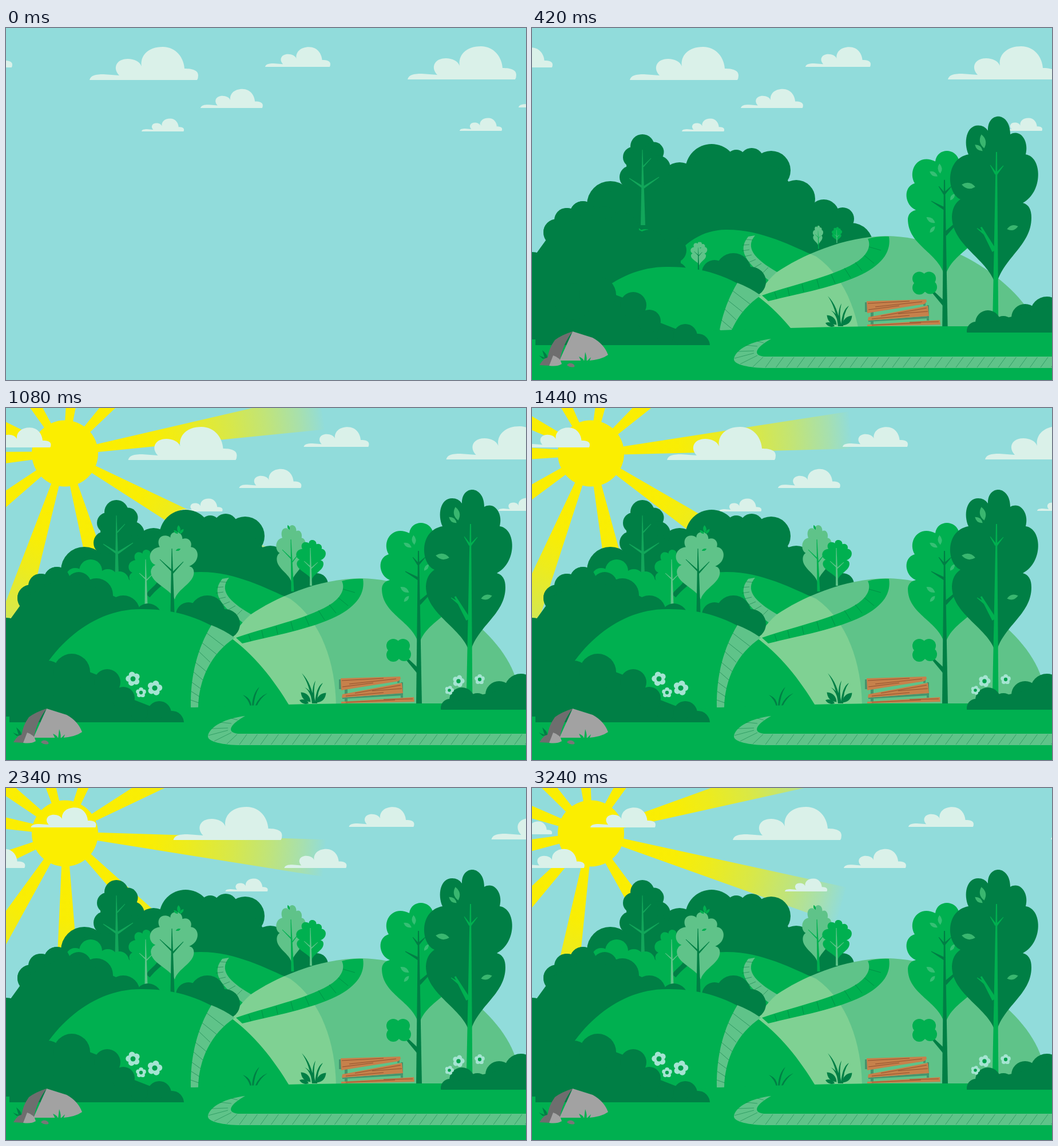
An HTML page with a canvas for the animation above (3.3 s loop, 909 px wide and 616 px high).

```html
<!DOCTYPE html>
<html lang="en">
<head>
<meta charset="utf-8">
<title>Sunny park</title>
<style>
html, body { margin: 0; width: 100%; height: 100%; overflow: hidden; background: #91dcdb; }
canvas { display: block; }
</style>
</head>
<body>
<canvas id="stage" width="909" height="616"></canvas>
<script>
const ctx = document.getElementById('stage').getContext('2d');
const LOOP = 3300, STEP = 60;
const SKY = '#91dcdb', CLOUD = '#daf1e9', DARK = '#007f45', GREEN = '#00b050',
  LIGHT = '#5fc389', PALE = '#7fd193', WOOD = '#c6814b', YELLOW = '#fbee00';

const CLOUD_PATH = new Path2D('M0 0C2-8 10-10 25-10L52-8C40-20 46-37 67-37C78-37 88-32 91-24C88-42 102-58 128-58C152-58 165-38 166-20C180-20 190-17 190-8Q190-3 188 0Z');
const CROWN = new Path2D('M811 430C800 385 734 362 734 312Q735 292 749 283C724 272 722 214 763 207C754 187 759 158 780 158Q791 158 797 167C796 134 836 134 836 173C855 163 869 186 863 207C892 211 894 270 858 289Q873 293 873 314C873 362 822 382 811 430Z');

// [angle in degrees at 720 ms, degrees per second]
const RAYS = [[-13.6, 11.75], [24.4, 13], [70, 11.7], [103, 12], [138.3, 12.1],
  [172, 11], [198.6, 11.7], [234, 11.8], [273, 11.6], [307.5, 14.4]];

// linear interpolation through [time, value] keys
function key(t, keys) {
  if (t <= keys[0][0]) return keys[0][1];
  for (let i = 1; i < keys.length; i++) {
    const [t0, a] = keys[i - 1], [t1, b] = keys[i];
    if (t <= t1) return a + (b - a) * (t - t0) / (t1 - t0);
  }
  return keys[keys.length - 1][1];
}

function shape(color, d) {
  ctx.fillStyle = color;
  ctx.fill(typeof d === 'string' ? new Path2D(d) : d);
}

function line(color, width, d) {
  ctx.strokeStyle = color;
  ctx.lineWidth = width;
  ctx.stroke(new Path2D(d));
}

function blobs(color, list) {
  ctx.fillStyle = color;
  for (const [x, y, r] of list) {
    ctx.beginPath();
    ctx.arc(x, y, r, 0, 7);
    ctx.fill();
  }
}

// tapered stroke
function limb(color, x0, y0, w0, x1, y1, w1) {
  const a = Math.atan2(y1 - y0, x1 - x0) + Math.PI / 2;
  const c = Math.cos(a) / 2, s = Math.sin(a) / 2;
  ctx.fillStyle = color;
  ctx.beginPath();
  ctx.moveTo(x0 + c * w0, y0 + s * w0);
  ctx.lineTo(x1 + c * w1, y1 + s * w1);
  ctx.lineTo(x1 - c * w1, y1 - s * w1);
  ctx.lineTo(x0 - c * w0, y0 - s * w0);
  ctx.fill();
}

function leaf(color, x, y, len, deg, w = len * .42) {
  group(() => {
    ctx.translate(x, y);
    ctx.rotate(deg * Math.PI / 180);
    shape(color, `M${-len / 2} 0Q0 ${-w} ${len / 2} 0Q0 ${w} ${-len / 2} 0Z`);
  });
}

function group(draw) {
  ctx.save();
  draw();
  ctx.restore();
}

function lifted(dy, draw) {
  group(() => { ctx.translate(0, dy); draw(); });
}

function popped(x, y, s, draw) {
  if (s <= 0) return;
  group(() => {
    ctx.translate(x, y);
    ctx.scale(s, s);
    ctx.translate(-x, -y);
    draw();
  });
}

function crown(color, x, y, w, h) {
  group(() => {
    ctx.translate(x, y);
    ctx.scale(w / 155, h / 287);
    ctx.translate(-730, -143);
    shape(color, CROWN);
  });
}

function sun(t) {
  const s = key(t, [[540, 0], [600, .6], [660, 1]]);
  if (!s) return;
  const end = key(t, [[600, 50], [720, 164], [840, 285], [960, 385], [1080, 455]]);
  group(() => {
    ctx.translate(103, 79.5);
    const fade = ctx.createRadialGradient(0, 0, 50, 0, 0, 458);
    [[0, 1], [.25, .98], [.4, .87], [.6, .66], [.75, .45], [.9, .2], [1, 0]]
      .forEach(([p, a]) => fade.addColorStop(p, `rgba(251,238,0,${a})`));
    ctx.fillStyle = fade;
    if (end > 55) for (const [deg, rate] of RAYS) {
      group(() => {
        ctx.rotate((deg + rate * (t - 720) / 1000) * Math.PI / 180);
        const w = 7 + .0645 * (end - 58);
        ctx.beginPath();
        ctx.moveTo(50, -6.5);
        ctx.lineTo(end, -w);
        ctx.lineTo(end, w);
        ctx.lineTo(50, 6.5);
        ctx.fill();
      });
    }
    blobs(YELLOW, [[0, 0, 58 * s]]);
  });
}

function clouds(t) {
  const dx = key(t, [[0, 0], [240, 13], [720, 45], [1440, 90], [1980, 124], [2700, 169], [3240, 205], [3300, 209]]);
  const put = (x, y, s) => group(() => {
    ctx.translate(x + dx, y);
    ctx.scale(s, s);
    shape(CLOUD, CLOUD_PATH);
  });
  for (const o of [-556, 0, 556]) {
    put(146 + o, o > 0 ? 90 : 91, 1);
    put(453 + o, o < 0 ? 69 : 68, .6);
    put(340 + (o < 0 ? -562 : o), o > 0 ? 139 : 140, .573);
    put(237 + o, o > 0 ? 180 : 181, .39);
  }
  put(-244, 81, .39);
}

function farWoods() {
  blobs(DARK, [[137, 284, 41], [258, 243, 33], [314, 224, 46], [357, 205, 17], [384, 206, 21],
    [418, 224, 34], [462, 274, 33], [510, 302, 27], [543, 309, 20], [558, 354, 38],
    [20, 400, 34], [42, 332, 22], [62, 312, 22], [89, 301, 23]]);
  shape(DARK, 'M0 640V390L40 320L90 290L140 260L250 225L310 200L380 200L430 220L465 265L510 295L545 310L590 340L596 380V640Z');
  blobs(DARK, [[193, 182, 21], [213, 192, 17.5], [177, 201, 18], [220, 220, 22], [173, 236, 20], [208, 236, 25], [193, 215, 28]]);
  limb('#12a65a', 194, 320, 8, 193, 188, 1);
  limb('#12a65a', 194, 218, 2.5, 208, 203, 1);
  limb('#12a65a', 195, 254, 4, 222, 236, 1);
  limb('#12a65a', 194, 254, 4, 170, 238, 1);
}

function nearWoods() {
  blobs(DARK, [[44, 333, 24], [60, 311, 21], [89, 301, 23], [127, 309, 22], [158, 327, 29], [205, 357, 29], [248, 364, 22], [0, 399, 32]]);
  shape(DARK, 'M0 640V380L36 330L90 300L160 315L230 350L260 370V640Z');
}

function backHills(pop) {
  blobs(GREEN, [[121, 297, 17], [148, 285, 20], [178, 300, 18], [198, 303, 17]]);
  shape(GREEN, 'M110 300H215L330 400H110Z');
  const hillA = new Path2D('M180 520C205 370 260 288 338 287C400 286 455 316 497 334C552 373 576 448 577 520Z');
  const hillB = new Path2D('M345 520C365 455 390 395 427 362C470 333 545 298 622 298C740 300 870 390 893 480V530H345Z');
  shape(GREEN, hillA);
  shape(LIGHT, 'M378 299L390 297C373 317 386 337 430 362L417 378C383 351 355 327 378 299Z');
  line('rgba(0,110,60,.6)', .8, 'M374 304L386 305M368 314L380 313M367 324L380 322M371 334L384 331M379 344L391 339M389 353L401 346M402 364L413 353');
  shape(LIGHT, hillB);
  group(() => {
    ctx.clip(hillB);
    shape(PALE, hillA);
  });
  shape(GREEN, 'M402 402C470 379 533 367 571 341C590 327 592 312 587 303Q605 298 624 299C628 323 615 346 577 365C532 387 470 398 413 412Z');
  line('rgba(0,110,60,.6)', .8, 'M589 317L610 323M581 332L598 346M565 344L577 359M546 354L557 371M523 365L530 381M498 374L502 389M472 382L475 396M447 389L450 403M424 396L428 408');

  popped(245, 343, pop, () => {
    crown(GREEN, 214, 248, 57, 82);
    limb(LIGHT, 245, 345, 5, 244, 265, 1);
    limb(LIGHT, 245, 302, 2, 257, 290, 1);
    limb(LIGHT, 245, 300, 2, 233, 289, 1);
  });
  popped(501, 320, pop, () => {
    crown(LIGHT, 472, 205, 52, 100);
    limb(GREEN, 501, 321, 5, 498, 230, 1);
    limb(GREEN, 500, 270, 2, 511, 256, 1);
    limb(GREEN, 500, 265, 2, 483, 248, 1);
    leaf(GREEN, 494, 209, 9, 70);
  });
  popped(533, 310, pop, () => {
    crown(GREEN, 507, 231, 52, 70);
    limb(LIGHT, 533, 311, 4, 532, 245, 1);
    limb(LIGHT, 533, 281, 2, 545, 270, 1);
    limb(LIGHT, 533, 279, 2, 521, 268, 1);
  });
}

function frontHill(pop) {
  blobs(DARK, [[250, 365, 22], [319, 362, 22], [352, 359, 31], [383, 378, 26]]);
  popped(291, 357, pop, () => {
    crown(LIGHT, 251, 217, 84, 118);
    limb(DARK, 291, 358, 7, 290, 246, 1);
    limb(DARK, 291, 289, 3, 310, 269, 1);
    limb(DARK, 291, 286, 3, 269, 265, 1);
    leaf(GREEN, 302, 212, 14, 85);
    leaf(GREEN, 297, 217, 10, 40);
    leaf(GREEN, 307, 216, 11, -50);
    leaf(GREEN, 301, 248, 9, -20);
  });
  shape(GREEN, 'M30 530C65 425 145 352 235 352C354 350 436 420 498 525Z');
  shape(LIGHT, 'M359 380Q380 388 400 402C358 430 337 475 336 524H323C322 468 335 420 359 380Z');
  line('rgba(0,110,60,.65)', .8, 'M351 394L381 417M343 411L368 431M337 426L357 445M331 445L350 461M328 462L344 476M325 480L340 491M324 496L338 505M323 511L337 516');
  shape(DARK, 'M429 522Q428 507 414 502Q424 510 427 522ZM430 522Q431 499 443 488Q434 503 433 522ZM435 522Q442 505 457 499Q444 508 438 522Z');
}

function sideBranch() {
  limb(DARK, 722, 462, 8, 694, 432, 3);
  blobs(GREEN, [[677, 416, 12], [694, 416, 12], [677, 432, 12], [696, 431, 12], [686, 425, 14]]);
}

function bigTrees() {
  shape(GREEN, 'M722 415C712 372 657 362 657 316Q658 304 671 301C651 293 648 262 669 256C656 234 675 204 705 219C708 195 742 195 747 219C776 206 793 234 780 256C800 262 800 293 777 301Q791 306 791 318C790 362 732 372 722 415Z');
  limb(DARK, 722, 520, 10, 721, 250, 2);
  limb(DARK, 721, 274, 4, 711, 261, 1);
  limb(DARK, 721, 273, 4, 733, 261, 1);
  limb(DARK, 721, 299, 5, 698, 286, 1);
  limb(DARK, 722, 342, 7, 743, 322, 3);
  [[713, 231, 17, 85], [702, 240, 16, 30], [735, 279, 14, -55], [697, 318, 18, 32], [700, 334, 14, -50]]
    .forEach(l => leaf('#35bf74', ...l));
  crown(DARK, 730, 143, 155, 287);
  limb(GREEN, 810, 520, 11, 812, 203, 2);
  limb(GREEN, 811, 240, 4, 801, 225, 1);
  limb(GREEN, 811, 241, 4, 824, 226, 1);
  limb(GREEN, 808, 370, 8, 785, 330, 3);
  limb(GREEN, 792, 342, 4, 778, 332, 1);
  [[788, 185, 24, 78], [781, 196, 17, 38], [763, 260, 24, 9], [840, 331, 20, -14]]
    .forEach(l => leaf('#39b66f', ...l));
}

function bench() {
  shape('#45936d', 'M582 475H586V492H582ZM592 490H597V517H592ZM684 473H688V481H684ZM690 480H694V507H690ZM588 507L694 499V503L588 509Z');
  shape(WOOD, 'M585 473L689 470L690 474L686 478L586 494ZM588 501L692 481L694 499L587 507ZM586 514L713 506L714 514L586 517Z');
  line('#8c4a2b', .9, 'M587 477L660 473M600 483L682 474M588 488L642 481M610 499L690 485M594 504L660 498M640 495L692 491M594 515L680 511M660 510L711 509');
}

function tuft() {
  shape(DARK, 'M535 517Q531 484 517 464Q535 482 539 517ZM537 517Q533 491 541 477Q536 494 541 517ZM540 517Q542 488 554 481Q544 494 544 517ZM537 517Q531 494 522 489Q535 494 540 517Z');
  leaf(DARK, 524, 506, 24, 45);
  leaf(DARK, 551, 507, 24, -45);
  leaf(DARK, 521, 514, 17, 18);
}

function rock() {
  shape('#a2a2a2', 'M71 526L106 537Q126 548 133 567Q122 575 100 577L48 577Z');
  shape('#6e6e6e', 'M71 526Q52 532 40 541Q29 556 27 574L48 580Q53 549 71 526Z');
  shape('#6e6e6e', 'M13 585Q22 569 37 568L32 586Z');
  shape('#a2a2a2', 'M37 568Q50 572 52 583Q44 588 30 586Z');
  shape('#777', 'M61 585Q64 580 70 582Q76 585 74 588Q67 590 61 585Z');
  shape(GREEN, 'M87 580L82 570Q90 573 91 579L93 562Q97 573 95 579L103 571Q101 578 98 581Z');
  shape(DARK, 'M19 574L12 568L22 572L18 559Q27 566 27 572Z');
}

function meadow() {
  shape(GREEN, 'M0 526H280Q440 519 600 517L909 517V780H0Z');
  shape(LIGHT, 'M418 539C394 552 383 567 405 570H909V590H405C374 589 352 583 353 574C356 557 384 543 418 539Z');
  let ticks = 'M394 543L405 546M374 550L394 552M360 561L388 560M354 573L388 564M364 583L394 568M386 588L404 571';
  for (let x = 408; x < 920; x += 18.5) ticks += `M${x} 589L${x + 13} 571`;
  line('rgba(0,120,65,.6)', .8, ticks);
  bench();
  tuft();
  group(() => {
    ctx.beginPath();
    ctx.rect(0, 380, 909, 148);
    ctx.clip();
    blobs(DARK, [[776, 525, 16], [797, 511, 22], [824, 518, 19], [862, 502, 24], [900, 494, 29]]);
    shape(DARK, 'M776 528V515L860 495L909 480V528Z');
  });
  group(() => {
    ctx.beginPath();
    ctx.rect(0, 380, 909, 170);
    ctx.clip();
    shape(DARK, 'M0 540V440L65 443L115 450L180 475L222 510L268 528L300 550H6V540Z');
    blobs(DARK, [[72, 474, 32], [115, 462, 32], [177, 480, 23], [205, 508, 20], [233, 533, 15], [268, 534, 21], [290, 551, 21]]);
  });
  rock();
}

function flowers(s) {
  for (const [x, y, r] of [[222, 474, 12], [236, 498, 8.5], [260, 490, 12.5], [791, 478, 10], [828, 475, 8.5], [775, 494, 7.5]]) {
    popped(x, y, s, () => {
      const petals = [];
      for (let i = 0; i < 5; i++) {
        const a = i * Math.PI * .4 + r;
        petals.push([x + Math.cos(a) * r * .6, y + Math.sin(a) * r * .6, r * .46]);
      }
      blobs('#a5e4d2', petals);
      blobs('#00a24d', [[x, y, r * .37]]);
    });
  }
}

function draw(t) {
  const ground = key(t, [[0, 150], [60, 108], [120, 82], [240, 40], [360, 10], [480, 0]]);
  const woods = key(t, [[0, 480], [60, 405], [240, 161], [360, 50], [480, 0]]);
  const trees = key(t, [[0, 500], [60, 470], [240, 157], [360, 50], [480, 0]]);
  const stretch = key(t, [[240, 1.21], [360, 1.07], [480, 1]]);
  const hills = key(t, [[180, 350], [240, 280], [360, 110], [480, 22], [540, 0]]);
  const pop = key(t, [[360, 0], [480, .7], [600, 1]]);

  ctx.fillStyle = SKY;
  ctx.fillRect(0, 0, 909, 616);
  sun(t);
  clouds(t);
  if (t < STEP) return;
  lifted(woods, farWoods);
  lifted(hills, () => backHills(pop));
  lifted(woods, nearWoods);
  lifted(hills, () => frontHill(pop));
  lifted(key(t, [[180, 220], [240, 134], [360, 45], [480, 0]]), sideBranch);
  group(() => {
    ctx.translate(0, 517 + trees);
    ctx.scale(1, stretch);
    ctx.translate(0, -517);
    bigTrees();
  });
  lifted(ground, meadow);
  flowers(key(t, [[480, 0], [600, .7], [660, 1]]));
}

let start;
function tick(now) {
  if (start === undefined) start = now;
  const t = (now - start) % LOOP;
  draw(Math.floor(t / STEP) * STEP);
  requestAnimationFrame(tick);
}
draw(0);
requestAnimationFrame(tick);
</script>
</body>
</html>
```
